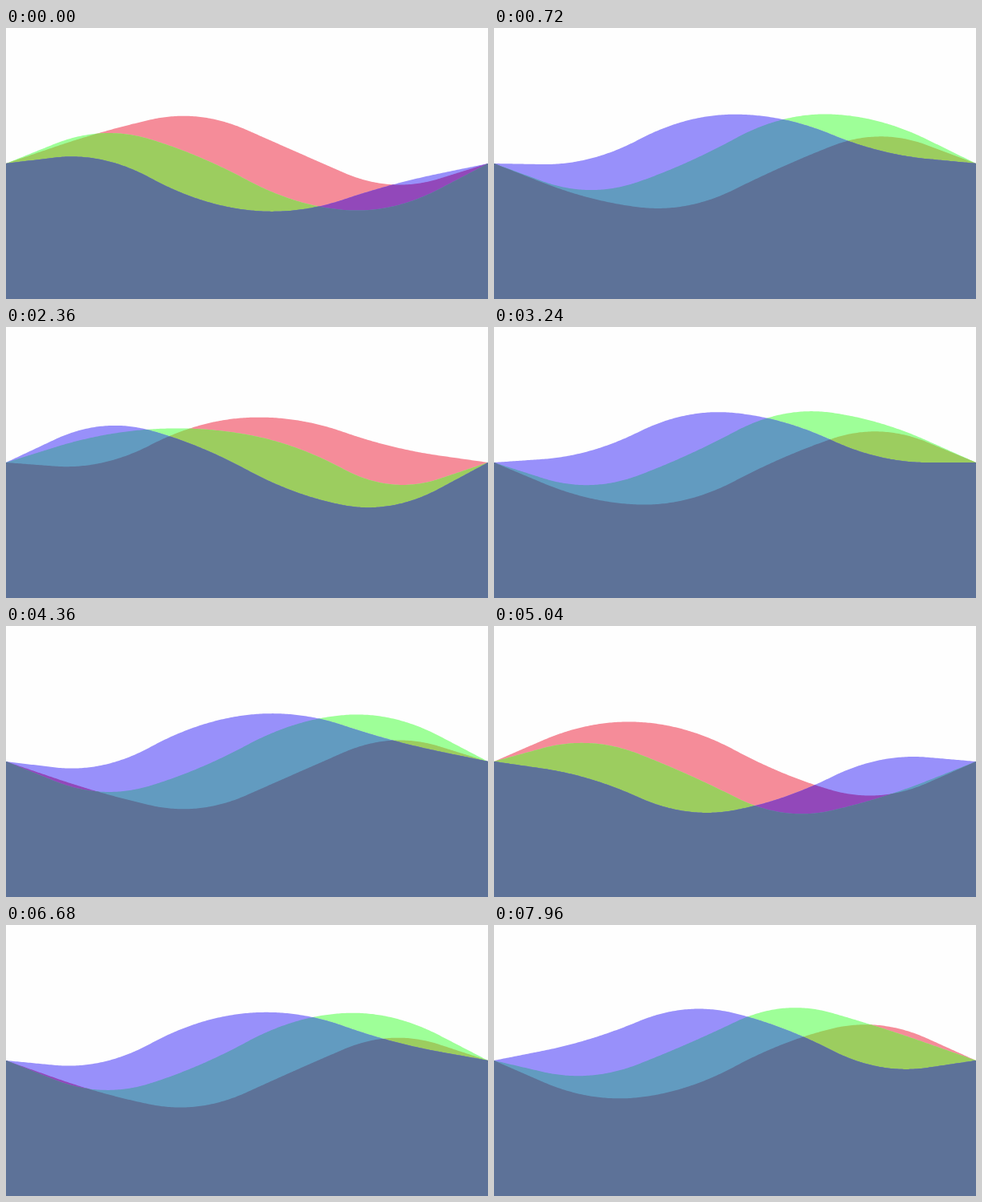
These frames come from a looping animation (600 by 338 pixels, 8000 ms). An HTML page:

```html
<!DOCTYPE html>
<html lang="en">
<head>
<meta charset="utf-8">
<title>Waves</title>
<style>
  html, body { margin: 0; width: 100%; height: 100%; overflow: hidden; background: #fefefe; }
  svg { display: block; width: 100vw; height: 100vh; }
</style>
</head>
<body>
<svg id="stage" viewBox="0 0 600 338" preserveAspectRatio="none"></svg>
<script>
const W = 600, H = 338, MID = 169, STEP = 120, LOOP = 8000, TICK = 40;

// Swing of each wave's control points; both ends stay fixed.
const WAVES = [
  [0, 58.5, 74.7, 66.2, 65, 0],   // blue
  [0, 51, 47, 77.5, 64, 0],       // green
  [0, 52.6, 72, 61, 55, 0]        // red
];

// Time in ms and wave phase in radians; the pace drifts slightly.
const PACE = [[0, 0.75], [1480, 7.65], [3240, 16.85], [4360, 22.74],
              [5720, 30.13], [6680, 35.36], [7960, 42.26]];

// Each layer fills the overlap of the waves it lists.
const LAYERS = [
  [[2], '#f58c99'],
  [[1], '#9eff98'],
  [[0], '#9890fa'],
  [[1, 2], '#9ccd5f'],
  [[0, 2], '#9248ba'],
  [[0, 1], '#629bc0'],
  [[0, 1, 2], '#5d7298']
];

const stage = document.getElementById('stage');
const paths = LAYERS.map(([, fill]) => {
  const path = document.createElementNS('http://www.w3.org/2000/svg', 'path');
  path.setAttribute('fill', fill);
  stage.appendChild(path);
  return path;
});

function phaseAt(t) {
  let k = 1;
  while (k < PACE.length - 1 && t > PACE[k][0]) k++;
  const [t0, p0] = PACE[k - 1], [t1, p1] = PACE[k];
  return p0 + (p1 - p0) * (t - t0) / (t1 - t0);
}

// Quadratic curves joined halfway between control points, straight at both ends.
function waveHeights(swing, phase) {
  const p = swing.map((a, i) => a * Math.sin(phase + i - 2));
  const at = i => i < 0 ? -p[1] : i > 5 ? -p[4] : p[i];
  const ys = [];
  for (let x = 0; x <= W; x += 2) {
    const u = x / STEP + 0.5, i = Math.floor(u), f = u - i;
    ys.push(MID + 0.5 * (1 - f) ** 2 * at(i - 1)
                + (0.5 + f - f * f) * at(i)
                + 0.5 * f * f * at(i + 1));
  }
  return ys;
}

function draw(t) {
  const phase = phaseAt(t);
  const waves = WAVES.map((swing, j) => waveHeights(swing, phase - j));
  LAYERS.forEach(([ids], n) => {
    const top = waves[0].map((_, k) =>
      `${k * 2} ${Math.max(...ids.map(j => waves[j][k])).toFixed(2)}`);
    paths[n].setAttribute('d', `M0 ${H}L${top.join('L')}L${W} ${H}Z`);
  });
}

const start = performance.now();
function frame() {
  const t = (performance.now() - start) % LOOP;
  draw(Math.floor(t / TICK) * TICK);
  requestAnimationFrame(frame);
}
draw(0);
requestAnimationFrame(frame);
</script>
</body>
</html>
```
